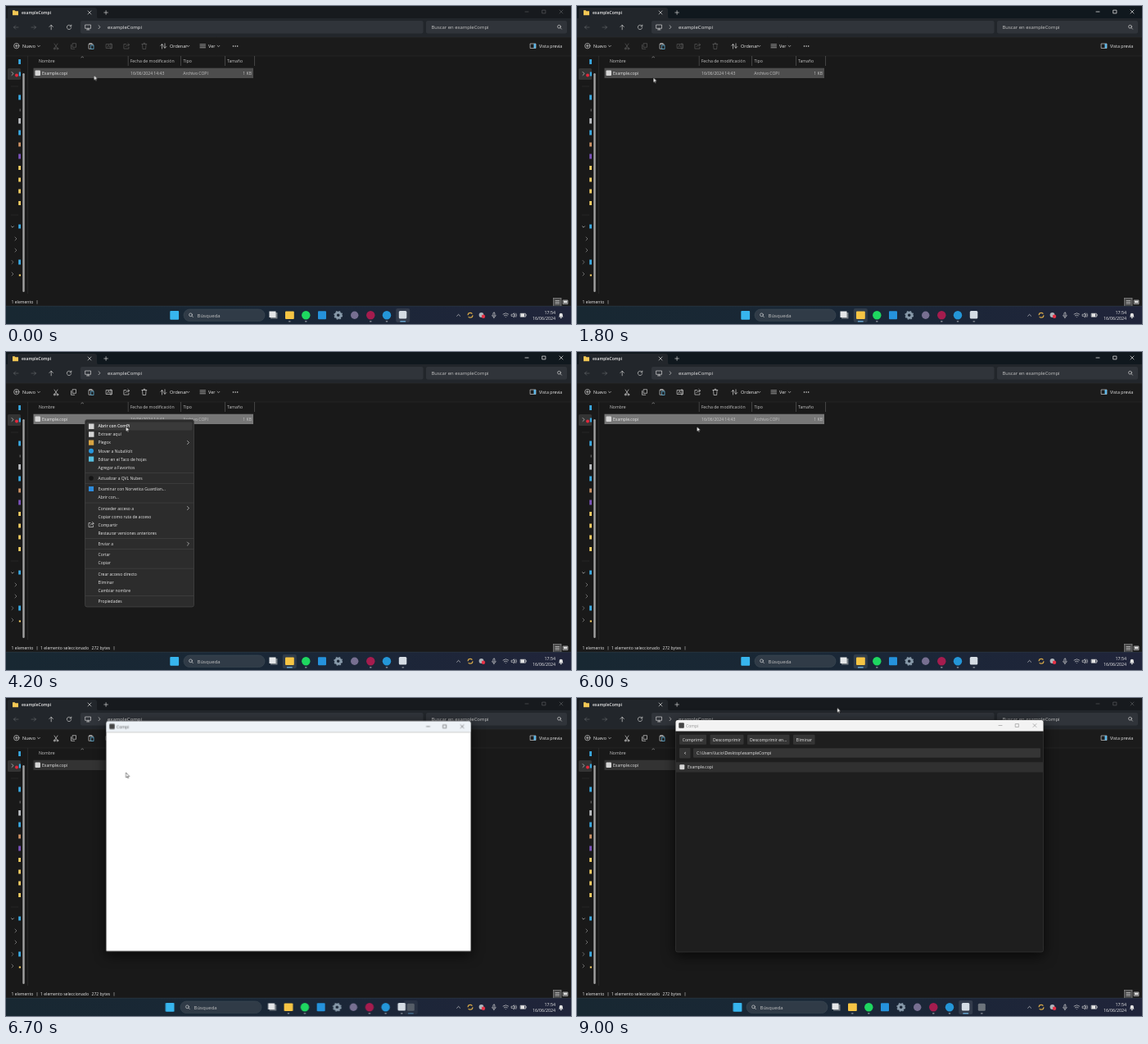
Write an HTML page that moves like this. It is 690 by 388 pixels and loops after 9.1 s.

```html
<!DOCTYPE html>
<html lang="es">
<head>
<meta charset="utf-8">
<title>exampleCompi</title>
<style>
html, body { margin: 0; width: 100%; height: 100%; overflow: hidden; background: #191919; }
svg { display: block; width: 100vw; height: 100vh; }
text { font: 5.1px "Open Sans", "Noto Sans", sans-serif; fill: #e8e8e8; white-space: pre; }
.big { font-size: 6px; }
.bold { font-weight: 600; }
.menu text { font-size: 5px; }
.soft { fill: #c4c4c4; }
.line { fill: none; stroke: #dcdcdc; stroke-width: .65; stroke-linecap: round; stroke-linejoin: round; }
.dim { opacity: .35; }
.dark text { fill: #222; }
.dark .line { stroke: #222; }

.explorer-on, .explorer-off, .snip-on, .snip-off, .compi-on, .compi-off, .selected, .unselected,
.tools-on, .tools-off, .hover, .menu, .window, .blank, .app, .start, .search, .pins, .cursor {
  animation: 9.1s linear infinite;
}
.explorer-on { animation-name: explorer-on; }
.explorer-off { animation-name: explorer-off; }
.snip-on { animation-name: snip-on; }
.snip-off { animation-name: snip-off; }
.compi-on { animation-name: compi-on; }
.compi-off { animation-name: compi-off; }
.selected { animation-name: selected; }
.hover { animation-name: hover; }
.tools-on { animation-name: tools-on; }
.tools-off { animation-name: tools-off; }
.unselected { animation-name: unselected; }
.menu { animation-name: menu; }
.window { animation-name: window; transform-origin: 345px 168.5px; }
.blank { animation-name: blank; }
.app { animation-name: app; }
.start { animation-name: start; }
.search { animation-name: search; }
.pins { animation-name: pins; }
.cursor { animation-name: cursor; }

@keyframes explorer-on { 0%, 3.2% { opacity: 0 } 5%, 72.4% { opacity: 1 } 72.5%, 100% { opacity: 0 } }
@keyframes explorer-off { 0%, 3.2% { opacity: 1 } 5%, 72.4% { opacity: 0 } 72.5%, 100% { opacity: 1 } }
@keyframes snip-on { 0%, 3.2% { opacity: 1 } 5%, 97.7% { opacity: 0 } 98.9%, 100% { opacity: 1 } }
@keyframes snip-off { 0%, 3.2% { opacity: 0 } 5%, 97.7% { opacity: 1 } 98.9%, 100% { opacity: 0 } }
@keyframes compi-on { 0%, 72.5% { opacity: 0 } 74%, 97.7% { opacity: 1 } 98.9%, 100% { opacity: 0 } }
@keyframes compi-off { 0%, 97.7% { opacity: 0 } 98.9%, 100% { opacity: 1 } }
@keyframes hover { 0%, 27.4% { opacity: 1 } 28.5%, 100% { opacity: 0 } }
@keyframes selected { 0%, 27.4% { opacity: 0 } 28.5%, 72.4% { opacity: 1 } 72.5%, 100% { opacity: 0 } }
@keyframes unselected { 0%, 72.4% { opacity: 0 } 72.5%, 100% { opacity: 1 } }
@keyframes tools-on { 0%, 27.4% { opacity: 0 } 28.5%, 100% { opacity: 1 } }
@keyframes tools-off { 0%, 27.4% { opacity: .35 } 28.5%, 100% { opacity: 0 } }
@keyframes menu { 0%, 32.6% { opacity: 0 } 35.2%, 54.8% { opacity: 1 } 57.2%, 100% { opacity: 0 } }
@keyframes window {
  0%, 72.4% { opacity: 0; transform: scale(.93) }
  72.53% { opacity: .4; transform: scale(.95) }
  73.6% { opacity: 1; transform: scale(.991) }
  75.8%, 100% { opacity: 1; transform: none }
}
@keyframes blank { 0%, 74.3% { opacity: 1 } 74.7%, 100% { opacity: 0 } }
@keyframes app { 0%, 72.4% { opacity: 0 } 73.6% { opacity: .7 } 75%, 100% { opacity: 1 } }
@keyframes start { 0%, 72.5% { transform: none } 73.6% { transform: translateX(-5.5px) } 75.8%, 100% { transform: translateX(-9.7px) } }
@keyframes search { 0%, 72.5% { transform: none } 73.6% { transform: translateX(-4px) } 75.8%, 100% { transform: translateX(-10px) } }
@keyframes pins { 0%, 72.9% { transform: none } 73.6% { transform: translateX(-1.3px) } 76.4%, 100% { transform: translateX(-10px) } }
@keyframes cursor {
  0%, 12.1% { transform: translate(107.5px, 84.5px) }
  13.1%, 17.6% { transform: translate(87.5px, 96.5px) }
  19.78% { transform: translate(93.3px, 87.3px) }
  23.1%, 33% { transform: translate(97px, 83.5px) }
  40.7%, 41.8% { transform: translate(102px, 87.5px) }
  46.15%, 86.8% { transform: translate(146.5px, 91px); animation-timing-function: ease-in-out }
  95.6%, 100% { transform: translate(317.7px, 11.7px) }
}
</style>
</head>
<body>
<svg viewBox="0 0 690 388" preserveAspectRatio="none">
  <defs>
    <linearGradient id="bar"><stop stop-color="#182832"/><stop offset=".5" stop-color="#1a2737"/><stop offset="1" stop-color="#20243a"/></linearGradient>
    <path id="right" class="line" d="M-1-2 1 0-1 2"/>
    <path id="down" class="line" d="M-1.4-.7 0 .7 1.4-.7"/>
    <g id="lens" class="line"><circle cx="-.5" cy="-.5" r="1.9"/><path d="M1 1 2.4 2.4"/></g>
    <path id="cross" class="line" d="M-2-2 2 2M2-2-2 2"/>
    <g id="buttons"><path class="line" d="M-23 0h4M-1.9-1.9h3.8v3.8h-3.8z"/><use href="#cross" x="21"/></g>
    <rect id="underline" x="-3.5" y="384.2" width="7" height="1.4" rx=".7" fill="#72b8e8"/>
    <rect id="dot" x="-1.3" y="384.2" width="2.6" height="1.2" rx=".6" fill="#9a9fa6"/>
    <rect id="tile" x="-8.5" y="369" width="17" height="17" rx="2" fill="#fff" opacity=".1"/>
    <g id="file-tools" class="line">
      <path d="M59 46l3.4 5.2M63 46l-3.4 5.2"/><circle cx="59.2" cy="52" r="1"/><circle cx="62.8" cy="52" r="1"/>
      <path d="M81.5 45.7h4v4.6h-4zM79.5 47.5v4.8h4.2"/>
      <path d="M122.5 46.5h7v5h-7zM124 50l1.3-2.5 1.3 2.5M128 45.5v7"/>
      <path d="M146.5 46.5h-2.6v5.6h6v-2M146 49.5q.5-2.5 4.5-2.3M148.8 45.5l1.8 1.7-1.8 1.7"/>
      <path d="M165.8 46.5h6M166.5 46.5l.5 6h3.6l.5-6M168 46v-.8h1.7v.8"/>
    </g>
  </defs>

  <rect width="690" height="388" fill="#191919"/>
  <rect width="690" height="16" fill="#10181e"/>
  <rect class="explorer-off" width="690" height="16" fill="#171a1e"/>
  <path d="M0 38V15h2V4q0-2 2-2h104q3 0 3 3v8q0 2 2 2h577v23z" fill="#22262b"/>
  <path d="M8 5.3h2.7l.8 1H15v5H8z" fill="#f5c754"/>
  <text class="bold" style="font-size:5px" x="19" y="10">exampleCompi</text>
  <use href="#cross" x="102" y="8"/>
  <path class="line" d="M119.8 8h4.6M122.1 5.7v4.6"/>
  <use class="explorer-on" href="#buttons" x="657" y="7"/>
  <g class="dim"><use href="#buttons" x="657" y="7"/></g>

  <path class="line dim" d="M15 26H9.5l2.2-2.2M9.5 26l2.2 2.2M31 26h5.5l-2.2-2.2M36.5 26l-2.2 2.2"/>
  <path class="line" d="M55.2 28.8v-5.6L53 25.4M55.2 23.2l2.2 2.2M79.4 24.5a2.7 2.7 0 1 0 .3 2M79.8 23v1.8H78"/>
  <rect x="91" y="18" width="418.500" height="15.500" rx="2" fill="#30343a"/>
  <rect x="513" y="18" width="172" height="15.500" rx="2" fill="#30343a"/>
  <path class="line" d="M97 23h6.500v4.300H97zM100.200 27.300v1.600M98.500 28.900h3.500"/>
  <use href="#right" x="114" y="25.700"/>
  <text class="big" x="124" y="28">exampleCompi</text>
  <text class="big soft" x="519.500" y="28" style="font-size:5.9px">Buscar en exampleCompi</text>
  <use href="#lens" x="676" y="25.700"/>

  <rect y="38" width="690" height="23" fill="#1b1b1b"/>
  <path d="M0 38h690M0 61h690" stroke="#2d2d2d" stroke-width=".6"/>
  <g class="line"><circle cx="12.800" cy="48.700" r="3.200"/><path d="M11.200 48.700h3.200M12.800 47.100v3.200"/></g>
  <text x="20" y="50.700" style="font-size:5.300px">Nuevo</text>
  <use href="#down" x="40" y="49"/>
  <g class="tools-off"><use href="#file-tools"/></g>
  <g class="tools-on"><use href="#file-tools"/></g>
  <path class="line" d="M102.500 46.200h-1.500v6h3M104.500 46.200h1.500v1.400M102.500 45.500h2v1.300h-2z"/>
  <rect x="103.700" y="48" width="3.300" height="4.500" fill="none" stroke="#6cc3ed" stroke-width=".7"/>
  <path class="line" d="M190.500 52v-5.500L188.700 48.300M190.500 46.500l1.700 1.800M194 45.800v5.500L192.300 49.500M194 51.300l1.800-1.800"/>
  <text x="200" y="50.700" style="font-size:5.500px">Ordenar</text>
  <use href="#down" x="222.500" y="49"/>
  <path class="line" d="M237 46.800h6.500M237 48.800h6.500M237 50.800h6.500"/>
  <text x="247" y="50.700" style="font-size:5.500px">Ver</text>
  <use href="#down" x="259.500" y="49"/>
  <path d="M277.500 49h5.500" fill="none" stroke="#e8e8e8" stroke-width="1.500" stroke-linecap="round" stroke-dasharray="0 2.600"/>
  <path class="line" d="M640.500 46h6.500v5.500h-6.500z"/><path d="M644.500 46h2.500v5.500h-2.500z" fill="#5db7e8"/>
  <text x="651" y="50.700" style="font-size:5.300px">Vista previa</text>

  <path d="M26.500 61v290" stroke="#303030" stroke-width=".7"/>
  <rect x="2" y="76" width="16" height="14" rx="1.500" fill="#343434"/>
  <g fill="#39a7df">
    <path d="M15.200 65h2.800v6h-2.800zM15.800 80.500H18v5h-2.200zM15.200 108.500h2.800v6h-2.800zM15.200 151.500h2.800v6h-2.800zM15.200 266.500h2.800v5h-2.800zM15.200 309.500h2.800v6h-2.800z"/>
  </g>
  <path d="M15.200 137h2.800v6.500h-2.800z" fill="#b9bcc0"/>
  <path d="M16.500 125.500h1.500v3h-1.500z" fill="#555"/>
  <path d="M15.200 166.500h2.800v5h-2.800z" fill="#c98f62"/>
  <path d="M15.200 180.500h2.800v6h-2.800z" fill="#7950b8"/>
  <path d="M15.200 195h2.800v5h-2.800zM15.200 209.500h2.800v5h-2.800zM15.200 223.500h2.800v5h-2.800zM15.200 238h2.800v5h-2.800zM15.800 327.500h2.200v2h-2.200z" fill="#f3cc62"/>
  <circle cx="13" cy="84.500" r="2" fill="#e5263a"/>
  <path d="M6 98h9M6 255h9" stroke="#2f2f2f" stroke-width=".6"/>
  <use href="#right" x="8" y="82.500"/><use href="#down" x="8" y="269.500"/>
  <g opacity=".65"><use href="#right" x="12" y="284"/><use href="#right" x="12" y="298"/><use href="#right" x="8" y="312.500"/><use href="#right" x="8" y="327"/></g>
  <rect x="20.300" y="82" width="2.400" height="267" rx="1.200" fill="#a2a2a2"/>

  <path d="M149.200 61v12M213.500 61v12M267.500 61v12M303.500 61v12" stroke="#565656" stroke-width=".7"/>
  <path class="line" opacity=".7" d="M91.800 62.800l1.400-1 1.400 1"/>
  <g class="soft"><text class="soft" x="40" y="69">Nombre</text><text class="soft" x="151.700" y="69" style="font-size:5.200px">Fecha de modificación</text><text class="soft" x="216.500" y="69">Tipo</text><text class="soft" x="270" y="69">Tamaño</text></g>
  <rect class="hover" x="33.500" y="75.700" width="268.500" height="12.300" fill="#4d4d4d"/>
  <rect class="selected" x="33.500" y="75.700" width="268.500" height="12.300" fill="#777"/>
  <rect class="unselected" x="33.500" y="75.700" width="268.500" height="12.300" fill="#333"/>
  <rect x="35.500" y="78.500" width="6.500" height="6.500" rx="1" fill="#d4d4d4"/>
  <text x="44" y="84" style="font-size:5px">Example.copi</text>
  <text class="soft" x="152" y="84">16/06/2024 14:43</text>
  <text class="soft" x="216.300" y="84">Archivo COPI</text>
  <text class="soft" x="300" y="84" text-anchor="end">1 KB</text>

  <text x="6.500" y="363.200">1 elemento</text>
  <path d="M38 359v4.600" stroke="#bbb" stroke-width=".6"/>
  <g class="tools-on"><text x="42" y="363.200">1 elemento seleccionado</text><text x="104.500" y="363.200">272 bytes</text><path d="M132 359v4.600" stroke="#bbb" stroke-width=".6"/></g>
  <rect x="668.500" y="356.500" width="9.500" height="10" fill="#4a4a4a" stroke="#999" stroke-width=".6"/>
  <path class="line" d="M671 359.500h4.500M671 361.300h4.500M671 363.100h4.500M680.500 359h5.500v4.600h-5.500z"/><rect x="681" y="359.500" width="4.500" height="3" fill="#ddd"/>

  <g class="menu">
    <rect x="96.500" y="82.500" width="133" height="228.500" rx="2.500" fill="#2c2c2c" stroke="#484848" stroke-width=".7"/>
    <rect x="98.500" y="85.500" width="129" height="10" rx="1.500" fill="#3a3a3a"/>
    <path d="M97 147.500h132M97 160.500h132M97 184h132M97 227.500h132M97 240.500h132M97 264.200h132M97 297.500h132" stroke="#454545" stroke-width=".6"/>
    <path d="M101 87.500h6.500v6.500H101zM101 97.200h6.500v6.500H101z" fill="#d4d4d4"/>
    <rect x="101" y="107.500" width="6.200" height="6.200" fill="#d9a443"/>
    <circle cx="104" cy="120.700" r="3" fill="#2797df"/>
    <rect x="101" y="127.500" width="6.200" height="6.200" fill="#57bfe0"/>
    <circle cx="104" cy="154" r="2.800" fill="#151515"/>
    <rect x="101" y="164" width="6" height="6" fill="#2d8bdc"/>
    <path class="line" d="M103 208.500h-2v5h5.500v-1.800M103 211.300q.5-2.300 4-2.200M105.500 207.500l1.700 1.600-1.700 1.700"/>
    <text class="bold" x="112.500" y="92.300">Abrir con ComPi</text>
    <text x="112.500" y="102.300">Extraer aquí</text>
    <text x="112.500" y="112.400">Plegox</text><use href="#right" x="222.500" y="110.500"/>
    <text x="112.500" y="122.500">Mover a NubaVolt</text>
    <text x="112.500" y="132.500">Editar en el Taco de hojas</text>
    <text x="112.500" y="142.600">Agregar a Favoritos</text>
    <text x="112.500" y="156">Actualizar a QVL Nubes</text>
    <text x="112.500" y="169.300">Examinar con Norvetica Guardian...</text>
    <text x="112.500" y="179.300">Abrir con...</text>
    <text x="112.500" y="192.500">Conceder acceso a</text><use href="#right" x="222.500" y="190.500"/>
    <text x="112.500" y="202.600">Copiar como ruta de acceso</text>
    <text x="112.500" y="212.700">Compartir</text>
    <text x="112.500" y="222.700">Restaurar versiones anteriores</text>
    <text x="112.500" y="236">Enviar a</text><use href="#right" x="222.500" y="234"/>
    <text x="112.500" y="249.400">Cortar</text>
    <text x="112.500" y="259.400">Copiar</text>
    <text x="112.500" y="272.700">Crear acceso directo</text>
    <text x="112.500" y="282.800">Eliminar</text>
    <text x="112.500" y="292.800">Cambiar nombre</text>
    <text x="112.500" y="306">Propiedades</text>
  </g>

  <g class="window">
    <rect x="120.500" y="27" width="449" height="283" rx="2.500" fill="#1e1e1e" stroke="#3c3c3c" stroke-width=".6" style="filter:drop-shadow(0 4px 8px #000b)"/>
    <path d="M120.500 40.500V29.500q0-2.500 2.500-2.500h444q2.500 0 2.500 2.500v11z" fill="#f3f3f3"/>
    <path class="compi-on" d="M120.500 40.500V29.500q0-2.500 2.500-2.500h444q2.500 0 2.500 2.500v11z" fill="#ecf2f9"/>
    <rect x="124.300" y="30.300" width="6.500" height="6.500" rx="1" fill="#444"/>
    <g class="dark">
      <g class="compi-on"><text x="133" y="35.600">Compi</text><path class="line" d="M515 33.500h4M535.600 31.600h3.800v3.800h-3.800zM557 31.500l4 4M561 31.500l-4 4"/></g>
      <g class="compi-off"><g opacity=".45"><text x="133" y="35.600">Compi</text><path class="line" d="M515 33.500h4M535.600 31.600h3.800v3.800h-3.800zM557 31.500l4 4M561 31.500l-4 4"/></g></g>
    </g>
    <g fill="#353535">
      <rect x="125" y="44.800" width="33" height="12" rx="1"/><rect x="162.500" y="44.800" width="41" height="12" rx="1"/>
      <rect x="208" y="44.800" width="51.500" height="12" rx="1"/><rect x="264" y="44.800" width="26.500" height="12" rx="1"/>
      <rect x="125" y="61" width="13.500" height="12.500" rx="1"/><rect x="142" y="61.300" width="424" height="11.500" rx="1"/>
    </g>
    <rect x="121" y="78.300" width="448" height="12.300" fill="#303030"/>
    <g text-anchor="middle"><text x="141.500" y="52.600">Comprimir</text><text x="183" y="52.600">Descomprimir</text><text x="233.700" y="52.600">Descomprimir en...</text><text x="277.200" y="52.600">Eliminar</text></g>
    <path class="line" d="M132.600 66.300l-1.400 1 1.400 1"/>
    <text x="146" y="69" style="font-size:5.050px">C:\Users\lucio\Desktop\exampleCompi</text>
    <rect x="125.300" y="81.300" width="6" height="6" rx="1" fill="#d4d4d4"/>
    <text x="135" y="86.200" style="font-size:5px">Example.copi</text>
    <rect class="blank" x="120.500" y="40.500" width="449" height="269.500" fill="#fff"/>
  </g>

  <rect y="366" width="690" height="22" fill="url(#bar)"/>
  <path d="M0 366.200h690" stroke="#35414b" stroke-width=".5"/>
  <rect class="start" x="200.300" y="372" width="10.800" height="10.800" rx="1" fill="#37b5ee"/>
  <g class="search">
    <rect x="217" y="370" width="99" height="14.600" rx="7.300" fill="#303b47" stroke="#43505b" stroke-width=".5"/>
    <use href="#lens" x="226" y="377.300"/>
    <text class="big soft" x="233.500" y="379.700">Búsqueda</text>
  </g>
  <g class="pins">
    <rect x="323" y="374" width="8.500" height="7.500" fill="#777e85"/><rect x="321.500" y="372.500" width="8" height="7.500" fill="#e4e6e8"/>
    <g class="explorer-on"><use href="#tile" x="346.300"/><use href="#underline" x="346.300"/></g>
    <use class="explorer-off" href="#dot" x="346.300"/>
    <rect x="341" y="372.500" width="10.800" height="9.500" rx="1" fill="#f6c544"/>
    <circle cx="366.300" cy="377.200" r="5.200" fill="#1ed760"/><use href="#dot" x="366.300"/>
    <rect x="381" y="372.200" width="10" height="10" rx="1" fill="#2592dc"/>
    <circle cx="405.700" cy="377.300" r="3.200" fill="none" stroke="#8799a9" stroke-width="2.800"/>
    <circle cx="405.700" cy="377.300" r="4.800" fill="none" stroke="#8799a9" stroke-width="1.300" stroke-dasharray="1.900"/>
    <circle cx="425.700" cy="377.300" r="4.700" fill="#776f91"/>
    <circle cx="445.300" cy="377.300" r="5.200" fill="#a51c4e"/><use href="#dot" x="445.300"/>
    <circle cx="465" cy="377.300" r="5.200" fill="#2496d8"/><use href="#dot" x="465"/>
    <g class="snip-on"><use href="#tile" x="484.700"/><use href="#underline" x="484.700"/></g>
    <use class="snip-off" href="#dot" x="484.700"/>
    <rect x="479.800" y="372" width="9.500" height="9.500" rx="1.500" fill="#d5dce4"/>
  </g>
  <g class="app">
    <g class="compi-on"><use href="#tile" x="494.300"/><use href="#underline" x="494.300"/></g>
    <use class="compi-off" href="#dot" x="494.300"/>
    <rect x="489.800" y="372.700" width="9" height="9" rx="1.500" fill="#6d747c"/>
  </g>

  <path class="line" d="M550.600 378.300l2-2 2 2"/>
  <circle cx="567" cy="377.300" r="2.900" fill="none" stroke="#d5a849" stroke-width="1.200" stroke-dasharray="7 2"/>
  <circle cx="580.500" cy="377" r="2.900" fill="#aeb4ba"/><circle cx="583" cy="378.800" r="2.200" fill="#e53247"/>
  <g class="line">
    <rect x="594.900" y="374" width="2" height="4.200" rx="1"/><path d="M593.600 377.300q.3 2.300 2.300 2.300t2.300-2.300M595.900 379.600v1.300"/>
    <path d="M607 376q3.300-2.700 6.600 0M608.300 377.800q2-1.600 4 0M610.300 379.600v.1"/>
    <path d="M617.500 376.200h1.200l1.700-1.500v5.200l-1.700-1.500h-1.200zM621.500 376q1 1.300 0 2.600M622.800 375q1.700 2.200 0 4.500"/>
    <path d="M628.500 375.200h6v4h-6zM635.300 376.500v1.400"/>
  </g>
  <path d="M628.500 375.200h4.700v4h-4.700z" fill="#e4e4e4"/>
  <g text-anchor="end"><text x="671" y="375.700" style="font-size:5.300px">17:54</text><text x="671" y="382.700" style="font-size:5.300px">16/06/2024</text></g>
  <path d="M675 379.600l.7-1.200v-1.500a2.100 2.100 0 0 1 4.200 0v1.500l.7 1.200z" fill="#e4e4e4"/><circle cx="677.800" cy="380.300" r=".9" fill="#e4e4e4"/>

  <path class="cursor" d="M0 0v6.200l1.400-1.300.9 2 .9-.4-.9-1.900h2z" fill="#fff" stroke="#000" stroke-width=".45"/>
</svg>
</body>
</html>
```
